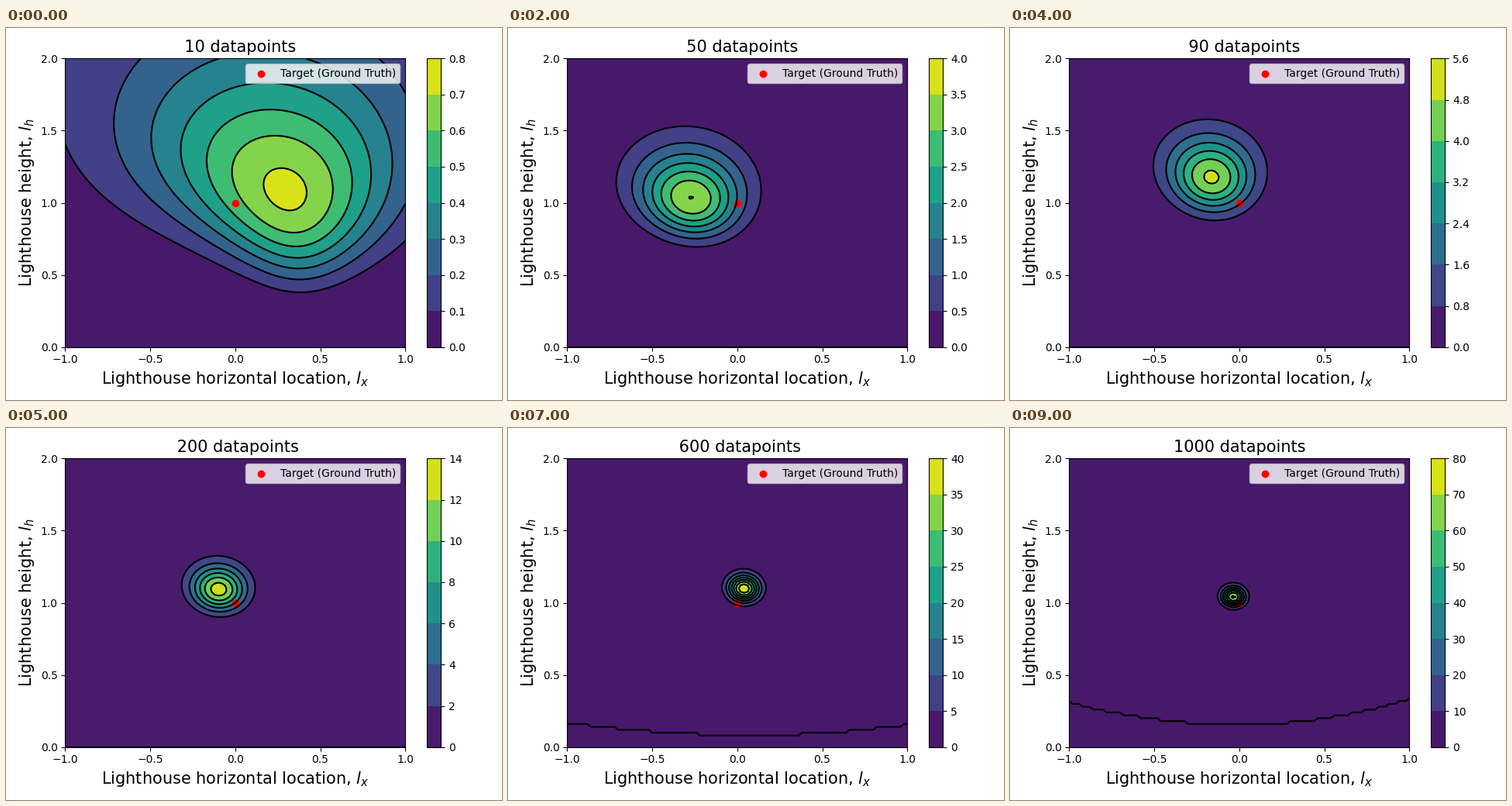
Recreate the animation shown at these times as a matplotlib script. Size 640x480 px, loop 9500 ms.

```python
import numpy as np
import matplotlib.pyplot as plt
from matplotlib.animation import FuncAnimation

COUNTS = [*range(10, 100, 10), *range(100, 1001, 100)]
STEP = 0.02

# the posterior mode wanders towards (0, 1): datapoints, lx, lh
PATH = np.array([
    (10, 0.297, 1.085),
    (30, -0.295, 0.970),
    (50, -0.271, 1.033),
    (70, -0.285, 1.166),
    (80, -0.227, 1.220),
    (100, -0.107, 1.140),
    (200, -0.097, 1.093),
    (600, 0.040, 1.098),
    (1000, -0.034, 1.0415),
])

LX, LH = np.meshgrid(np.arange(-50, 51) * STEP, np.arange(101) * STEP)
LH = np.maximum(LH, 1e-16)
Z = LX + 1j * LH


def mode_at(n):
    log_n = np.log(PATH[:, 0])
    return [np.interp(np.log(n), log_n, col) for col in PATH[:, 1:].T]


def posterior(n):
    """Cauchy posterior of n flashes, expanded around its mode on the unit disc."""
    a, b = mode_at(n)
    far = Z - (a - 1j * b)
    w = (Z - (a + 1j * b)) / far

    # sampling scatter of the angular moments fades as data comes in
    m2 = (0.48 * np.cos(2.8 * np.log(n / 10)) - 0.63j) / np.sqrt(n)
    m3 = -3 / n
    loglik = np.log(4 * b * LH / np.abs(far) ** 2)
    loglik += (m2 * w ** 2 + 2 / 3 * m3 * w ** 3).real

    pdf = np.exp(n * loglik)
    return pdf / (pdf.sum() * STEP ** 2)


def draw(i):
    n = COUNTS[i]
    pdf = posterior(n)
    fig.clear()
    ax = fig.subplots()

    fill = ax.contourf(LX, LH, pdf)
    ax.contour(LX, LH, pdf, colors="black")
    ax.scatter(0, 1, color="red", label="Target (Ground Truth)")
    ax.set(xlim=(-1, 1), ylim=(0, 2),
           xticks=np.linspace(-1, 1, 5), yticks=np.linspace(0, 2, 5))
    ax.set_xlabel("Lighthouse horizontal location, $l_x$", fontsize=15)
    ax.set_ylabel("Lighthouse height, $l_h$", fontsize=15)
    ax.set_title(f"{n:4d} datapoints", fontsize=15)
    ax.legend(loc="upper right")
    fig.colorbar(fill, ax=ax)
    fig.tight_layout()
    return []


fig = plt.figure(figsize=(6.4, 4.8), dpi=100)
anim = FuncAnimation(fig, draw, frames=len(COUNTS), init_func=lambda: draw(0),
                     interval=500, repeat=True, repeat_delay=0)
plt.show()
```
